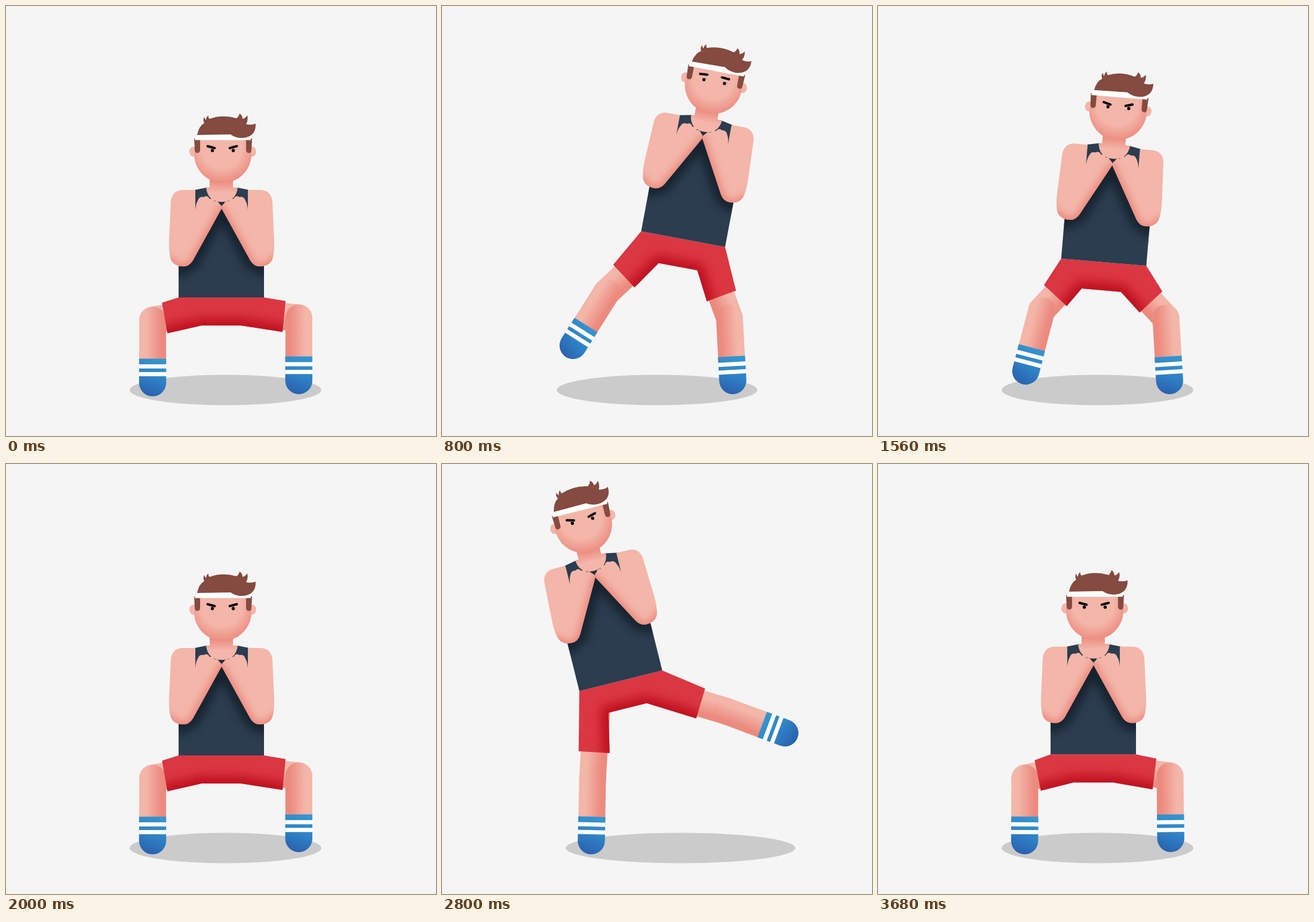
An HTML page with a canvas for the animation above (3.72 s loop, 720x720 px).

```html
<!DOCTYPE html>
<html>
<head>
<meta charset="utf-8">
<style>
  html, body { margin: 0; height: 100%; overflow: hidden; background: #f5f5f5; }
  canvas { display: block; }
</style>
</head>
<body>
<canvas id="stage" width="720" height="720"></canvas>
<script>
const ctx = document.getElementById('stage').getContext('2d');
const LOOP = 3720, STEP = 40, RAD = Math.PI / 180;
const MID = 360.5, WAIST = 488, SHIN = 105, REACH = 244, CROTCH = WAIST + 47;
const SKIN = '#f3b6a9', BLUSH = '#ec8a7e', HAIR = '#854a40';

// One side kick each way; `open` is the leg's angle from vertical in the squat, `swing` at the peak
const KICKS = [
  { side: -1, peak: 1120, rise: 144, shift: 87, tilt: 19.4, leg: 135, open: 30, swing: 70 },
  { side: 1, peak: 2995, rise: 138, shift: 73, tilt: 16.3, leg: 140, open: 36, swing: 83 }
];

function smooth(a, b, v) {
  const u = Math.min(1, Math.max(0, (v - a) / (b - a)));
  return u * u * (3 - 2 * u);
}
const mix = (a, b, u) => a + (b - a) * u;
const progress = (kick, t) => smooth(730, 70, Math.abs(t - kick.peak));

function rotate(x, y, degrees) {
  const c = Math.cos(degrees * RAD), s = Math.sin(degrees * RAD);
  return [x * c - y * s, x * s + y * c];
}

function bodyPose(kick, k) {
  return {
    x: MID - kick.side * kick.shift * k ** 1.8,
    y: WAIST - kick.rise * k,
    angle: -kick.side * kick.tilt * k ** 1.55
  };
}

// The leg swings about the hip and straightens on the way up
function swingingFoot(kick, k, body) {
  const { side } = kick;
  const [hx, hy] = rotate(side * 47.5, 26, body.angle);
  const angle = mix(kick.open, kick.swing, k) - 45 * k * (1 - k) * 1.8;
  const length = mix(kick.leg, REACH, k);
  return {
    x: body.x + hx + side * length * Math.sin(angle * RAD),
    y: body.y + hy + length * Math.cos(angle * RAD),
    angle: -side * angle * (1 - (1 - k) ** 1.5)
  };
}

function standingFoot(kick, k) {
  const foot = swingingFoot(kick, 0, bodyPose(kick, 0));
  return { x: foot.x - kick.side * 5 * k, y: foot.y, angle: -kick.side * 14 * k * (1 - k) };
}

function fill(path, color) {
  ctx.fillStyle = color;
  ctx.fill(path);
}
function ellipse(x, y, rx, ry, color) {
  ctx.beginPath();
  ctx.ellipse(x, y, rx, ry, 0, 0, 7);
  ctx.fillStyle = color;
  ctx.fill();
}
function gradient(x0, y0, x1, y1, ...stops) {
  const g = ctx.createLinearGradient(x0, y0, x1, y1);
  stops.forEach(([at, color]) => g.addColorStop(at, color));
  return g;
}
// Soft line along an edge, kept inside the shape
function shade(shape, edge, color, width, blur) {
  ctx.save();
  ctx.clip(shape);
  ctx.filter = `blur(${blur}px)`;
  ctx.strokeStyle = color;
  ctx.lineWidth = width;
  ctx.stroke(edge);
  ctx.restore();
}
const polygon = (points, closed = true) =>
  new Path2D('M' + points.map(p => p.join(' ')).join('L') + (closed ? 'Z' : ''));

const ARM = new Path2D('M317 308H297Q279 308 276 326L273 392Q272 411 276 424Q281 436 297 436Q307 436 313 426' +
  'L361 339Q362 334 357 331Q355 326 349 327Q347 321 341 323Q337 316 331 320Q324 318 321 326Q318 331 317 341Z');
const ARM_EDGE = new Path2D('M272 425Q282 440 298 439Q309 438 315 427L363 340');
const NECK = new Path2D('M341 280H380V304H388Q385 328 361 328Q338 328 335 304H341Z');
const HAIR_SHAPE = new Path2D('M320 216Q323 201 332 196Q329 190 332 186Q333 190 335 191Q335 186 339 183' +
  'Q338 187 341 189Q362 181 386 188Q390 185 391 180Q396 183 396 189Q401 188 404 183Q406 191 402 198' +
  'Q412 200 418 197Q419 219 396 221Q384 221 376 215Z');

// Turns a foot on the stage into a leg in body coordinates
function legPose(foot, body, side, rise) {
  const [dx, dy] = rotate(foot.x - body.x, foot.y - body.y, -body.angle);
  const x = MID + dx, y = WAIST + dy, angle = (foot.angle - body.angle) * RAD;
  const knee = [x + SHIN * Math.sin(angle), y - SHIN * Math.cos(angle)];
  const hip = [MID + side * 47.5, WAIST + 26];
  const vx = knee[0] - hip[0], vy = knee[1] - hip[1], length = Math.hypot(vx, vy);
  const nx = -side * vy / length, ny = side * vx / length;
  const cover = .5 + rise / 800 + .2 * Math.exp(-rise / 15);
  const ex = hip[0] + vx * cover, ey = hip[1] + vy * cover;
  const outer = [ex - nx * 26, ey - ny * 26], inner = [ex + nx * 26, ey + ny * 26];
  const cut = inner[0] + vx / vy * (CROTCH - inner[1]);
  const crotch = [MID + side * Math.max(33, side * (cut - MID)), CROTCH];
  return { x, y, angle, knee, hip, side, nx, ny, outer, inner, crotch };
}

function drawLeg({ x, y, angle, knee, hip, side, nx, ny }) {
  const tones = [[.25, SKIN], [.85, BLUSH]];
  const [kx, ky] = knee;
  ctx.lineWidth = 45;
  ctx.lineCap = 'round';
  ctx.strokeStyle = gradient(kx - nx * 22, ky - ny * 22, kx + nx * 22, ky + ny * 22, ...tones);
  ctx.stroke(polygon([hip, knee], false));

  ctx.save();
  ctx.translate(x, y);
  ctx.rotate(angle);
  ctx.strokeStyle = gradient(side * 22, 0, -side * 22, 0, ...tones);
  ctx.stroke(polygon([[0, -SHIN], [0, -20]], false));
  fill(new Path2D('M-22.7-40.5H22.7V0A22.7 22.7 0 0 1-22.7 0Z'),
    gradient(14, -40, -8, 22, [0, '#3596cf'], [.5, '#2f83c6'], [1, '#2a60ae']));
  ctx.fillStyle = '#fff';
  ctx.fillRect(-23, -31, 46, 7);
  ctx.fillRect(-23, -18, 46, 7);
  ctx.restore();
}

function drawShorts(l, r) {
  const shape = polygon([[289, WAIST], l.outer, l.inner, l.crotch, r.crotch, r.inner, r.outer, [432, WAIST]]);
  fill(shape, '#db3742');
  shade(shape, polygon([l.inner, l.crotch, r.crotch, r.inner], false), '#bd0d1d', 24, 9);
}

function drawShirt(h) {
  const shirt = polygon([[316, 308 - h], [336, 304 - h], [387, 304 - h], [407, 308 - h], [407, 350 - h],
    [432, 390 - h], [432, WAIST], [289, WAIST], [289, 390 - h], [316, 350 - h]]);
  fill(shirt, '#2b3d4f');
  shade(shirt, polygon([[290, 442 - h], [312, 430 - h], [361, 342 - h], [410, 430 - h], [432, 442 - h]], false),
    '#15202b', 20, 8);
}

function drawArm() {
  fill(ARM, SKIN);
  shade(ARM, ARM_EDGE, BLUSH, 16, 6);
}

function drawHead(calm) {
  ellipse(314, 244, 7, 8.5, SKIN);
  ellipse(412, 244, 7, 8.5, SKIN);
  const face = ctx.createRadialGradient(361, 238, 34, 361, 238, 60);
  face.addColorStop(0, SKIN);
  face.addColorStop(1, BLUSH);
  ellipse(363, 248, 48, 48, face);
  fill(new Path2D('M315 222H325V241Q325 246 320 246Q316 246 316 240ZM402 222H412L411 240Q411 246 407 246Q402 246 402 241Z'), HAIR);
  fill(new Path2D('M319 215H410V224.5H316Z'), '#fff');
  fill(HAIR_SHAPE, HAIR);

  ctx.strokeStyle = '#000';
  ctx.lineWidth = 4;
  for (const side of [-1, 1]) {
    const x = 363 + side * 17.5;
    ellipse(x, 242, 2.7, 2.7, '#000');
    ctx.save();
    ctx.translate(x + (side < 0 ? -2 : 0), 236.3 - 3 * calm);
    ctx.rotate(-side * (15 - 19 * calm) * RAD);
    ctx.stroke(new Path2D('M-6 0H6'));
    ctx.restore();
  }
}

function draw(t) {
  const kick = KICKS.find(c => progress(c, t) > 0) || KICKS[0];
  const k = progress(kick, t), body = bodyPose(kick, k);
  const [left, right] = KICKS.map(c => c === kick ? swingingFoot(c, k, body) : standingFoot(c, k));
  const rise = WAIST - body.y, stretch = .235 * rise;
  const leftLeg = legPose(left, body, -1, rise), rightLeg = legPose(right, body, 1, rise);

  ctx.fillStyle = '#f5f5f5';
  ctx.fillRect(0, 0, 720, 720);
  const x0 = Math.min(207, left.x - 27.5), x1 = Math.max(528, right.x + 17.5);
  ellipse((x0 + x1) / 2, 643, (x1 - x0) / 2, 25.5, '#cbcbcb');

  ctx.save();
  ctx.translate(body.x, body.y);
  ctx.rotate(body.angle * RAD);
  ctx.translate(-MID, -WAIST);
  drawLeg(leftLeg);
  drawLeg(rightLeg);
  drawShorts(leftLeg, rightLeg);
  drawShirt(stretch);
  ctx.translate(0, -stretch);
  fill(NECK, gradient(0, 292, 0, 312, [0, BLUSH], [1, SKIN]));
  drawArm();
  ctx.save();
  ctx.translate(722, 0);
  ctx.scale(-1, 1);
  drawArm();
  ctx.restore();
  drawHead(kick.side < 0 ? smooth(.45, .65, k) : 0);
  ctx.restore();
}

function tick() {
  draw(Math.floor(performance.now() % LOOP / STEP) * STEP);
  requestAnimationFrame(tick);
}
tick();
</script>
</body>
</html>
```
